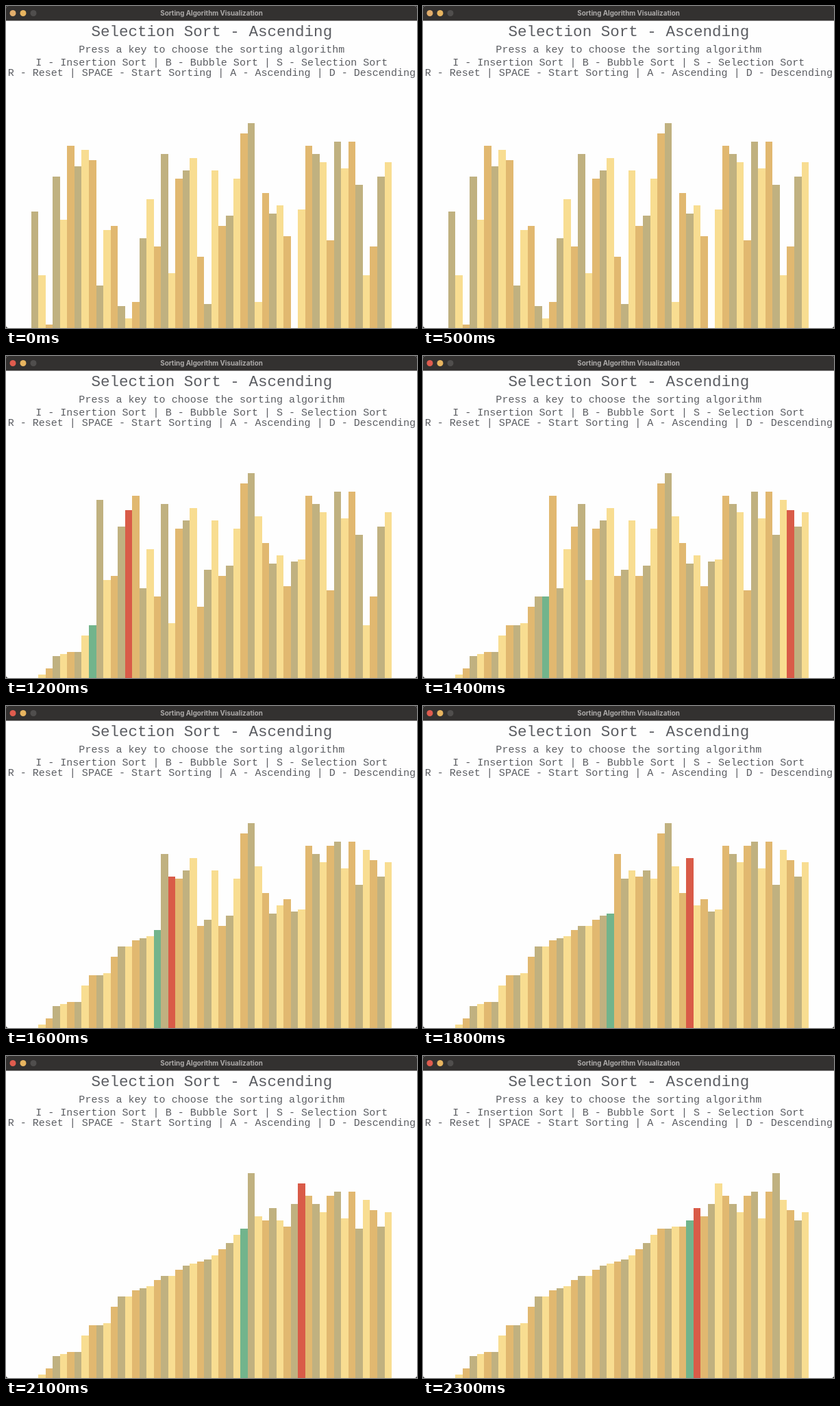
Animation of 600 by 470 pixels, one loop 2400 ms. Source, as an HTML page:

```html
<!DOCTYPE html>
<html lang="en">
<head>
<meta charset="utf-8">
<title>Sorting Algorithm Visualization</title>
<style>
  html, body { margin: 0; width: 100%; height: 100%; overflow: hidden; background: #242322; }
  svg { display: block; width: 600px; height: 470px; border-radius: 4px; background: #fefefe; }
  text { text-anchor: middle; }
  .bar { font: 700 9.8px Inter, sans-serif; fill: #acaaa9; }
  .mono { font-family: "Liberation Mono", "Courier New", monospace; font-size: 15.04px; fill: #5b5d62; }
  .big { font-size: 22.56px; }
</style>
</head>
<body>
<svg viewBox="0 0 600 470">
  <rect width="600" height="21.5" fill="#333130"/>
  <circle id="close" cx="10" cy="10.5" r="4.5"/>
  <circle cx="25" cy="10.5" r="4.5" fill="#e8b560"/>
  <circle cx="40" cy="10.5" r="4.5" fill="#504e4d"/>
  <text class="bar" x="300" y="14">Sorting Algorithm Visualization</text>
  <text class="mono big" x="300.3" y="44">Selection Sort - Ascending</text>
  <text class="mono" x="300.3" y="68">Press a key to choose the sorting algorithm</text>
  <text class="mono" x="300.3" y="87">I - Insertion Sort | B - Bubble Sort | S - Selection Sort</text>
  <text class="mono" x="300.3" y="102">R - Reset | SPACE - Start Sorting | A - Ascending | D - Descending</text>
  <g id="bars" shape-rendering="crispEdges"></g>
</svg>
<script>
const LOOP = 2400, STEP = 100, SORT_START = 900, PASSES_PER_STEP = 2.3;
const SHADES = ['#c0b180', '#f8dd91', '#e1b870'];
const RED = '#d95b48', GREEN = '#72b48c', GREY = '#8b8c8f';
const VALUES = [
  57, 26, 2, 74, 53, 89, 79, 87, 82, 21, 48, 50, 11, 5, 13, 44, 63, 40, 85, 27,
  73, 77, 83, 35, 12, 77, 50, 55, 73, 95, 100, 13, 66, 56, 60, 45, 0, 58, 89, 85,
  81, 43, 91, 78, 91, 70, 26, 40, 74, 81
];

const edge = i => Math.round(36.8 + 10.525 * i);
const group = document.getElementById('bars');
const closeDot = document.getElementById('close');

const bars = VALUES.map((_, i) => {
  const bar = document.createElementNS('http://www.w3.org/2000/svg', 'rect');
  bar.setAttribute('x', edge(i));
  bar.setAttribute('width', edge(i + 1) - edge(i));
  return group.appendChild(bar);
});

// Runs selection sort up to and including the given pass.
function sortTo(pass) {
  const list = VALUES.slice();
  let min = -1;
  for (let i = 0; i <= pass; i++) {
    min = i;
    for (let j = i + 1; j < list.length; j++) if (list[j] < list[min]) min = j;
    [list[i], list[min]] = [list[min], list[i]];
  }
  return { list, min };
}

function passAt(time) {
  const step = Math.floor((time - SORT_START) / STEP);
  return step < 0 ? -1 : Math.floor(1.501 + PASSES_PER_STEP * step);
}

function draw(pass) {
  const { list, min } = sortTo(pass);
  bars.forEach((bar, i) => {
    const top = Math.min(470, 471 - 3 * list[i]);
    let fill = SHADES[i % 3];
    if (i === pass) fill = pass === 1 ? GREY : GREEN;
    if (i === min) fill = RED;
    bar.setAttribute('y', top);
    bar.setAttribute('height', 470 - top);
    bar.setAttribute('fill', fill);
  });
  closeDot.setAttribute('fill', pass < 0 ? '#e2ae6c' : '#e05c4e');
}

const start = performance.now();
let shown = null;

function tick() {
  const pass = passAt((performance.now() - start) % LOOP);
  if (pass !== shown) draw(shown = pass);
  requestAnimationFrame(tick);
}
tick();
</script>
</body>
</html>
```
